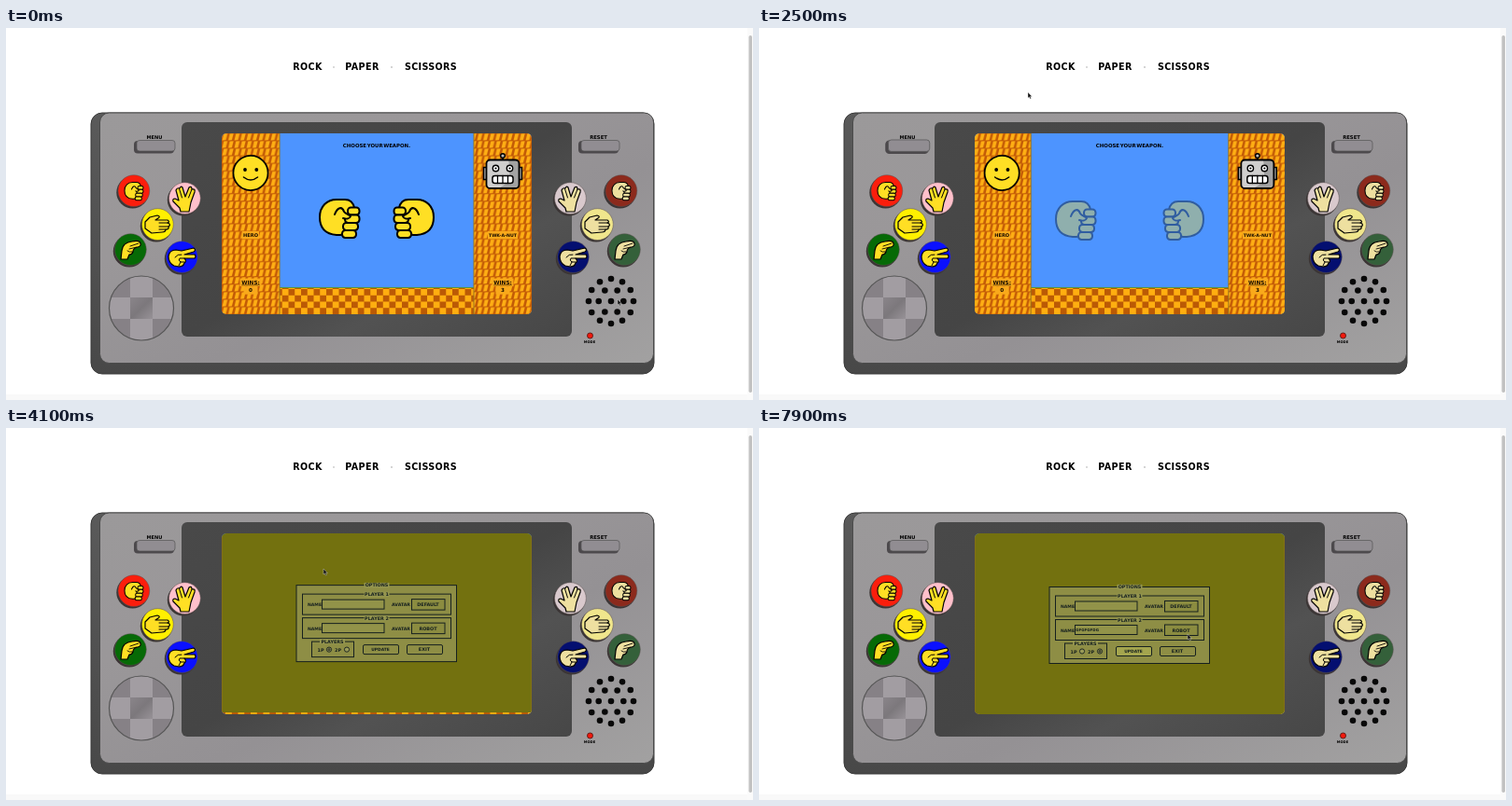
Recreate the animation shown at these times as an HTML page. Size 800x399 px, loop 8 s.

```html
<!DOCTYPE html>
<html lang="en">
<head>
<meta charset="utf-8">
<title>Rock Paper Scissors</title>
<style>
html, body { margin: 0; width: 100%; height: 100%; overflow: hidden; background: #fff; }
svg { display: block; width: 800px; height: 399px; }
text { font-family: "DejaVu Sans", sans-serif; font-weight: bold; text-anchor: middle; white-space: pre; }
</style>
</head>
<body>
<script>
const LOOP = 8000, INK = '#16201f', YELLOW = '#ffdf24', PALE = '#eee0a0';

// ---- markup helpers ----
const attrs = a => Object.entries(a).map(([k, v]) => ` ${k}="${v}"`).join('');
const el = (tag, a, inner = '') => `<${tag}${attrs(a)}>${inner}</${tag}>`;
const box = (x, y, x2, y2, fill, a = {}) =>
  el('rect', { x, y, width: x2 - x, height: y2 - y, fill, ...a });
const disc = (cx, cy, r, fill, a = {}) => el('circle', { cx, cy, r, fill, ...a });
const line = (d, w = 1, stroke = '#000', a = {}) =>
  el('path', { d, fill: 'none', stroke, 'stroke-width': w, 'stroke-linecap': 'round', 'stroke-linejoin': 'round', ...a });
const at = (x, y, inner) => el('g', { transform: `translate(${x} ${y})` }, inner);
const label = (x, y, str, size, fill = '#000', a = {}) => el('text', { x, y, 'font-size': size, fill, ...a }, str);

// ---- hands ----
const shape = (d, fill, w = 1.2) => line(d, w, '#000', { fill });
function fist(c, w = 2) {
  const finger = (x, y, x2, y2) => box(x, y, x2, y2, c, { rx: 3.4, stroke: '#000', 'stroke-width': w });
  return shape('M23 39H19C7 38 1 31 1 20C1 8 9 1 19 1H28C34 1 37 5 38 10L34 36Z', c, w) +
    finger(31, 9.5, 43.5, 17.5) + finger(28, 17.5, 43.5, 26) + finger(26, 26, 42, 34) + finger(25, 34, 40, 42) +
    shape('M17 17C20 9 25 8 27 14C29 17 33 17 34 19C33 22 29 22 26 21', c, w);
}
const smallFist = c => el('g', { transform: 'translate(-10 -10) scale(.47)' }, fist(c, 2.2));
const vulcan = c => shape('M-4 14L-5 10L-12 3Q-13 0 -10 0L-6 2L-9 -9Q-8 -12 -5 -11Q-4 -14 -2 -12L1 -2L5 -12Q8 -14 8 -10Q12 -11 11 -7L7 4L5 14Z', c) +
  line('M-5.5 -10.5L-2.5 -1M8 -10L4.5 -1', 1);
const paper = c => shape('M-13 -3L-8 -8L0 -10Q4 -9 1 -7L-2 -5H11Q14 -3 11 -2L13 -1Q14 1 12 2Q13 5 9 5Q9 8 5 8L-6 9L-13 4Z', c) +
  line('M2 -2H11M2 2H12M2 5H9', 1);
const lizard = c => shape('M-10 10L-9 1Q-8 -8 2 -9Q10 -11 11 -7Q12 -4 8 -3Q3 -2 3 2Q2 5 -1 5L-3 10Z', c) +
  line('M0 -4L9 -7M-1 -1L7 -3M-3 1Q-1 3 2 2', 0.9);
const scissors = c => shape('M-14 -1Q-13 -8 -6 -8L0 -7L13 -10Q16 -8 13 -6L3 -3L14 -3Q16 -1 14 1L3 1Q6 4 3 6Q2 10 -3 10L-8 9Q-14 6 -14 -1Z', c) +
  line('M3 1H-2Q-4 3 -1 5H3M-1 5L-3 9M-7 0Q-4 -4 0 -3', 1);

const roundKey = (x, y, fill, icon, c) => disc(x - 1, y + 1.4, 17.2, '#3b3535') +
  disc(x + .4, y - .4, 16.9, fill, { stroke: '#5a5050', 'stroke-width': .5 }) + at(x, y, icon(c));
const keys = [[136.5, 175, smallFist, '#fb1e0c', '#8c2a1c'], [191, 183, vulcan, '#ffc0cb', '#d9c9cd'],
  [162, 211, paper, '#fff000', '#f0e68c'], [133, 238, lizard, '#066a06', '#34603a'],
  [188, 246, scissors, '#0a10ff', '#040f70']];
const pads = keys.map(([x, y, icon, left, right]) =>
  roundKey(x, y, left, icon, YELLOW) + roundKey(795 - x, y, right, icon, PALE)).join('');

const pill = (id, x) => el('g', { id }, box(x - 22, 121, x + 21, 134.5, '#4c494c', { rx: 4 }) +
  box(x - 19, 120.5, x + 22, 132, '#918d92', { rx: 3, stroke: '#555', 'stroke-width': .7 }));

// ---- console ----
function speaker() {
  let s = disc(648, 293, 3.3, '#080808');
  for (const [n, r] of [[6, 13.3], [12, 24]])
    for (let i = 0; i < n; i++) {
      const a = i * 2 * Math.PI / n;
      s += disc((648 + r * Math.cos(a)).toFixed(2), (293 + r * Math.sin(a)).toFixed(2), 3.3, '#080808');
    }
  return s;
}
const dpad = disc(145, 300.5, 34.5, '#868186') +
  el('g', { 'clip-path': 'url(#padClip)' }, box(133, 265, 157, 336, '#a29da2') + box(110, 289, 180, 312, '#a29da2') +
    box(133, 289, 157, 312, 'url(#hub)')) +
  disc(145, 300.5, 34.5, 'none', { stroke: '#555', 'stroke-width': 1.2 });

const consoleBody = box(91, 91, 694, 371, 'url(#side)', { rx: 12, stroke: '#3a3a3a' }) +
  box(100.5, 91, 693.5, 359.5, 'url(#metal)', { rx: 10, stroke: '#4b4b4b' }) +
  box(188, 101, 606, 331, 'url(#bezel)', { rx: 6 });

// ---- game screen ----
const smiley = disc(0, 0, 18.6, YELLOW, { stroke: '#000', 'stroke-width': 1.8 }) +
  disc(-6, -3.5, 1.9, '#000') + disc(6.3, -3.5, 1.9, '#000') + line('M-7.5 4.5Q0 10.5 7.5 4.5', 1.5);
const robot = line('M0 -15V-18', 2) + disc(0, -18.5, 2.3, '#b9b9b9', { stroke: '#000', 'stroke-width': 1.4 }) +
  box(-20.5, -6, -16, 7, '#aaa', { stroke: '#000', 'stroke-width': 1.5 }) + box(16, -6, 20.5, 7, '#999', { stroke: '#000', 'stroke-width': 1.5 }) +
  box(-17.5, -14, 17.5, 16.5, '#d0cfce', { rx: 4 }) + el('path', { d: 'M6 -14H14Q17.5 -14 17.5 -10V13Q17.5 16.5 14 16.5H-6Q12 12 6 -14', fill: '#a3a3a3' }) +
  box(-17.5, -14, 17.5, 16.5, 'none', { rx: 4, stroke: '#000', 'stroke-width': 1.8 }) +
  [-7.5, 7.5].map(x => disc(x, -5, 3.2, '#fff', { stroke: '#000', 'stroke-width': 1.4 }) + disc(x, -5, 1.1, '#000')).join('') +
  box(-11, 3, 11, 11, '#fff', { rx: 2.5, stroke: '#000', 'stroke-width': 1.5 }) + line('M-5.5 3V11M0 3V11M5.5 3V11', 1.3);

const tag = (y, str, size, half, a = {}) => box(-half, y - 6, half, y + 2.5, '#f9a91b') + label(0, y, str, size, '#1a0f00', a);
function side(id, x, x2, cx, face, name, size, half, wins) {
  const edge = cx < 400 ? x2 : x;
  return el('g', { id }, box(x, 113, x2, 307, 'url(#zig)') + line(`M${edge} 113V307`, 1, '#94701c') +
    at(cx, 155.5, face) + at(cx, 0, tag(223.8, name, size, half) +
      tag(274.6, 'WINS:', 5.7, 11.5, { 'text-decoration': 'underline' }) + tag(283.2, wins, 5.6, 7.5)));
}

const FIELD = '#8e8e45';
const edged = (x, y, x2, y2, fill = 'none', a = {}) => box(x, y, x2, y2, fill, { stroke: INK, 'stroke-width': 1, ...a });
const ink = (x, y, str, size) => label(x, y, str, size, INK);
const legend = (x, y, str) => box(x - 13.5, y - 4.5, x + 13.5, y + 1, '#94954f') + ink(x, y, str, 4.9);
const player = (n, y, avatar) => edged(317.5, y, 476.5, y + 22) + legend(397, y + 2, 'PLAYER ' + n) +
  ink(330.5, y + 13, 'NAME', 4.6) + edged(338.5, y + 6, 405, y + 16, '#929349', { id: 'input' + n }) +
  ink(423, y + 13, 'AVATAR', 4.7) + edged(434.5, y + 5.5, 470, y + 17, '#8b8c40') + ink(452, y + 13, avatar, 4.9);
const dialog = edged(311, 170.5, 482.5, 252.5, FIELD) + legend(397, 172.3, 'OPTIONS') +
  player(1, 180, 'DEFAULT') + player(2, 205.5, 'ROBOT') +
  edged(327.5, 231, 372.5, 247.5) + legend(349.5, 232.5, 'PLAYERS') +
  ink(337, 241.6, '1P', 4.9) + ink(355.5, 241.6, '2P', 4.9) +
  [346, 365].map((x, i) => disc(x, 239.5, 2.6, '#9a9b58', { stroke: INK, 'stroke-width': .9 }) + disc(x, 239.5, 1.7, '#474a35', { id: 'radio' + i })).join('') +
  edged(382.5, 234.5, 420.5, 244.5, FIELD, { rx: 1.5, id: 'update' }) + ink(401, 241.3, 'UPDATE', 4.4) +
  edged(429.5, 234.5, 467.5, 244.5, FIELD, { rx: 1.5 }) + ink(448, 241.3, 'EXIT', 4.9) +
  el('text', { id: 'typed', x: 339.3, y: 218.2, 'font-size': 4, fill: INK, style: 'text-anchor:start' }) +
  line('M339.7 213V219.5', .6, '#000', { id: 'caret' });

const screen = el('g', { 'clip-path': 'url(#screenClip)' },
  box(231, 113, 563, 307, '#4d94ff') + box(231, 278.5, 563, 307, 'url(#check)') + line('M231 278.5H563', 1.2, '#5b9638') +
  label(397, 128, 'CHOOSE YOUR WEAPON.', 5.4, '#000', { 'word-spacing': -1.2 }) +
  el('g', { id: 'handL' }, fist(YELLOW)) + el('g', { id: 'handR' }, fist(YELLOW)) +
  el('g', { id: 'menu' }, box(231, 113, 563, 307, '#73710f') + dialog) +
  side('sideL', 231, 293, 262, smiley, 'HERO', 5.1, 9, '0') + side('sideR', 501, 563, 532, robot, 'TWK-A-NUT', 4.7, 16, '3'));

const stops = (...list) => list.map(([offset, c]) => el('stop', { offset, 'stop-color': c })).join('');
const grad = (id, x2, y2, ...list) => el('linearGradient', { id, x1: 0, y1: 0, x2, y2 }, stops(...list));
const tile = (id, x, y, width, height, inner) => el('pattern', { id, x, y, width, height, patternUnits: 'userSpaceOnUse' }, inner);
const defs = el('defs', {},
  grad('metal', 1, 1, [0, '#9b999a'], [.3, '#9a9799'], [.6, '#949194'], [1, '#a2a1a1']) +
  grad('side', 0, 1, [0, '#5a5a5a'], [1, '#484848']) +
  grad('bezel', 1, 1, [0, '#494949'], [.5, '#454545'], [.7, '#525252'], [1, '#474747']) +
  grad('hub', 1, 1, [0, '#8a858a'], [.5, '#7c787c'], [1, '#979297']) +
  tile('zig', 231, 113, 6.5, 8.1, box(0, 0, 6.5, 8.1, '#c25a06') +
    el('path', { d: 'M2.2 .5L6.2 .2L4.4 7.2L.5 7.6Z', fill: '#ffae14' })) +
  tile('check', 397, 280, 13.5, 13.5, box(0, 0, 13.5, 13.5, '#ffae10') + box(0, 0, 6.75, 6.75, '#bb5a05') + box(6.75, 6.75, 13.5, 13.5, '#bb5a05')) +
  el('clipPath', { id: 'screenClip' }, box(231, 113, 563, 307, '#000', { rx: 5 })) +
  el('clipPath', { id: 'padClip' }, disc(145, 300.5, 34.5, '#000')));

const title = (x, str) => label(x, 45.3, str, 9.6, '#000', { 'letter-spacing': .35 });
const heading = title(323, 'ROCK') + title(381.5, 'PAPER') + title(455, 'SCISSORS') +
  disc(351, 42, .7, '#999') + disc(413, 42, .7, '#888');

const pointers = el('g', { id: 'cursor' },
  el('path', { id: 'arrow', d: 'M0 0V6L1.4 4.9L2.4 7L3.4 6.5L2.5 4.5H4.3Z', fill: '#111', stroke: '#ddd', 'stroke-width': .4 }) +
  el('path', { id: 'point', d: 'M0 0Q1 -1.5 1.8 0V2L5 3V5.5L4 7.5H1.2L-1.2 4L0 3.5Z', fill: '#fff', stroke: '#222', 'stroke-width': .8 }) +
  line('M-1.3 -3H1.3M0 -3V3M-1.3 3H1.3', .8, '#111', { id: 'beam' }));

document.body.innerHTML = el('svg', { xmlns: 'http://www.w3.org/2000/svg', viewBox: '0 0 800 399' },
  defs + box(0, 0, 800, 399, '#fff') + box(0, 393, 800, 399, '#f9f9f9') + box(794, 0, 800, 399, '#fafafa') +
  box(795.5, 8, 799, 391, '#c1c1c1', { rx: 1.7 }) + heading + consoleBody +
  pill('menuKey', 159) + pill('resetKey', 635) + label(159, 118.6, 'MENU', 5.1) + label(634.5, 118.6, 'RESET', 5.3) +
  dpad + speaker() + disc(625.5, 330, 3, '#f3180c', { stroke: '#5a1a16', 'stroke-width': .9 }) + label(625, 338, 'MODE', 3.7) +
  screen + pads + pointers);

// ---- motion ----
const $ = Object.fromEntries([...document.querySelectorAll('[id]')].map(n => [n.id, n]));
const clamp = v => Math.max(0, Math.min(1, v));
const ease = (t, from, dur) => { const p = clamp((t - from) / dur); return p * p * (3 - 2 * p); };
const move = (n, x, y) => n.setAttribute('transform', `translate(${x.toFixed(2)} ${y.toFixed(2)})`);
const show = (n, on) => n.setAttribute('opacity', +on);

const trail = [[0, 655, 291], [400, 480, 262], [900, 180, 152], [1300, 160, 128], [1700, 164, 127], [2250, 166, 127],
  [2500, 288, 69], [2700, 300, 56], [3000, 299, 54], [3600, 320, 101], [4500, 356, 191], [4800, 362, 218],
  [6400, 362, 218], [6650, 364, 239], [6900, 366, 239], [7150, 400, 238], [7400, 404, 238], [7600, 444, 236], [7900, 459, 221]];
function cursorAt(t) {
  const i = trail.findIndex(k => k[0] > t);
  if (i < 0) return trail[trail.length - 1].slice(1);
  const [a, b] = [trail[i - 1], trail[i]], p = (t - a[0]) / (b[0] - a[0]);
  return [a[1] + (b[1] - a[1]) * p, a[2] + (b[2] - a[2]) * p];
}

function draw(t) {
  const open = 62 * ease(t, 2330, 1650);
  move($.sideL, -open, 0);
  move($.sideR, open, 0);
  move($.menu, 0, -233 * (1 - ease(t, 2070, 2143)));

  const idle = (1 - Math.cos(t / 1700 * 3 * Math.PI)) / 2, leave = clamp((t - 2300) / 400);
  const out = leave ? 3 + 30 * leave : 3 * idle;
  const y = 183 + (leave ? 2 : 2 * idle);
  move($.handL, 335 - out, y);
  $.handR.setAttribute('transform', `translate(${459 + out} ${y}) scale(-1 1)`);
  for (const h of [$.handL, $.handR]) show(h, clamp(1 - leave * 1.26));

  const grow = 1 + .1 * (ease(t, 1150, 250) - ease(t, 2400, 350));
  $.menuKey.setAttribute('transform', `translate(159 127) scale(${grow}) translate(-159 -127)`);

  const chars = Math.round(8 * clamp((t - 5800) / 600)), focus = t >= 4900 && t < 6700;
  $.typed.textContent = 'GFGFGFDG'.slice(0, chars);
  $.input2.setAttribute('stroke', focus ? '#000' : INK);
  show($.caret, focus && chars === 0 && t >= 5200);
  show($.radio0, t < 6700);
  show($.radio1, t >= 6700);
  $.update.setAttribute('fill', t >= 7100 ? '#a4a54e' : FIELD);

  const [cx, cy] = cursorAt(t);
  move($.cursor, cx, cy);
  const hand = t >= 1200 && t < 2300 || t >= 7100 && t < 7500;
  const beam = t >= 4700 && t < 6500;
  show($.point, hand);
  show($.beam, beam);
  show($.arrow, !hand && !beam);
}

const start = performance.now();
function tick() {
  const t = (performance.now() - start) % LOOP;
  draw(Math.floor(t / 100) * 100);
  requestAnimationFrame(tick);
}
draw(0);
requestAnimationFrame(tick);
</script>
</body>
</html>
```
